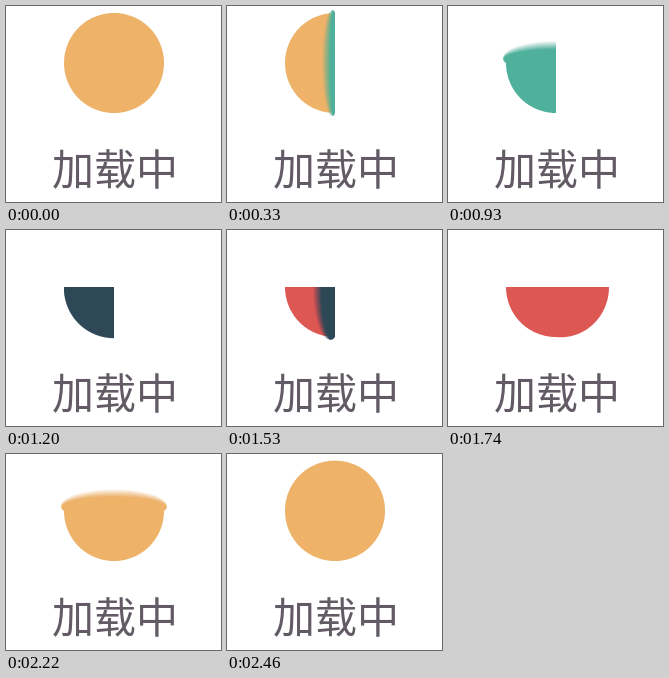
These frames come from a looping animation (215x196 px, 2.49 s). An HTML page with a canvas:

```html
<!DOCTYPE html>
<html lang="zh">
<head>
<meta charset="utf-8">
<style>
  html, body { margin: 0; width: 100%; height: 100%; overflow: hidden; background: #fff; }
  canvas { display: block; }
</style>
</head>
<body>
<canvas id="stage" width="215" height="196"></canvas>
<script>
const W = 215, H = 196, CX = 108, CY = 57, R = 50;
const LOOP = 2490, STEP = 30, SHUTTER = 15, SAMPLES = 16, CAMERA = 150;
const ORANGE = '#eeb269', TEAL = '#4fb09c', RED = '#dd5753', DARK = '#2f4858';

// Sector angles are in degrees, clockwise from the right; times in ms.
const folds = [
  { start: 0,    end: 630,  flap: [-90, 90],  base: [90, 270], under: ORANGE, front: ORANGE, back: TEAL,   vertical: true },
  { start: 660,  end: 1260, flap: [180, 270], base: [90, 180], under: TEAL,   front: TEAL,   back: DARK,   vertical: false },
  { start: 1260, end: 1860, flap: [90, 180],  base: [90, 180], under: RED,    front: DARK,   back: RED,    vertical: true },
  { start: 1890, end: 2490, flap: [0, 180],   base: [0, 180],  under: ORANGE, front: RED,    back: ORANGE, vertical: false }
];

const ctx = document.getElementById('stage').getContext('2d');
const layer = document.createElement('canvas');
layer.width = W;
layer.height = H;
const scene = layer.getContext('2d');

const ease = p => (1 - Math.cos(Math.PI * p)) / 2;

// Draws a sector turned by theta about the vertical or horizontal axis, in perspective.
function sector([from, to], color, theta = 0, vertical = true) {
  const cos = Math.cos(theta), sin = Math.sin(theta);
  scene.fillStyle = color;
  scene.beginPath();
  scene.moveTo(CX, CY);
  for (let a = from; a <= to; a += 2) {
    const x = R * Math.cos(a * Math.PI / 180), y = R * Math.sin(a * Math.PI / 180);
    const scale = CAMERA / (CAMERA - Math.abs(vertical ? x : y) * sin);
    scene.lineTo(CX + x * scale * (vertical ? cos : 1), CY + y * scale * (vertical ? 1 : cos));
  }
  scene.fill();
}

function drawScene(fold, time) {
  const p = (time - fold.start) / (fold.end - fold.start);
  const theta = Math.PI * ease(Math.min(1, Math.max(0, p)));
  const lifted = theta < Math.PI / 2;
  scene.fillStyle = '#fff';
  scene.fillRect(0, 0, W, H);
  sector(fold.base, fold.under);
  sector(fold.flap, lifted ? fold.front : fold.back, theta, fold.vertical);
}

function render(time) {
  const fold = folds.findLast(f => f.start <= time);
  // Average several moments of the shutter for motion blur.
  for (let i = 0; i < SAMPLES; i++) {
    drawScene(fold, time + SHUTTER * ((i + 0.5) / SAMPLES - 0.5));
    ctx.globalAlpha = 1 / (i + 1);
    ctx.drawImage(layer, 0, 0);
  }
  ctx.globalAlpha = 1;
  ctx.fillStyle = '#625b65';
  ctx.font = '300 42px "Noto Sans CJK SC", "Noto Sans CJK", sans-serif';
  ctx.textAlign = 'center';
  ctx.fillText('加载中', 109, 178.5);
}

function tick() {
  render(Math.floor(performance.now() % LOOP / STEP) * STEP);
  requestAnimationFrame(tick);
}
tick();
</script>
</body>
</html>
```
